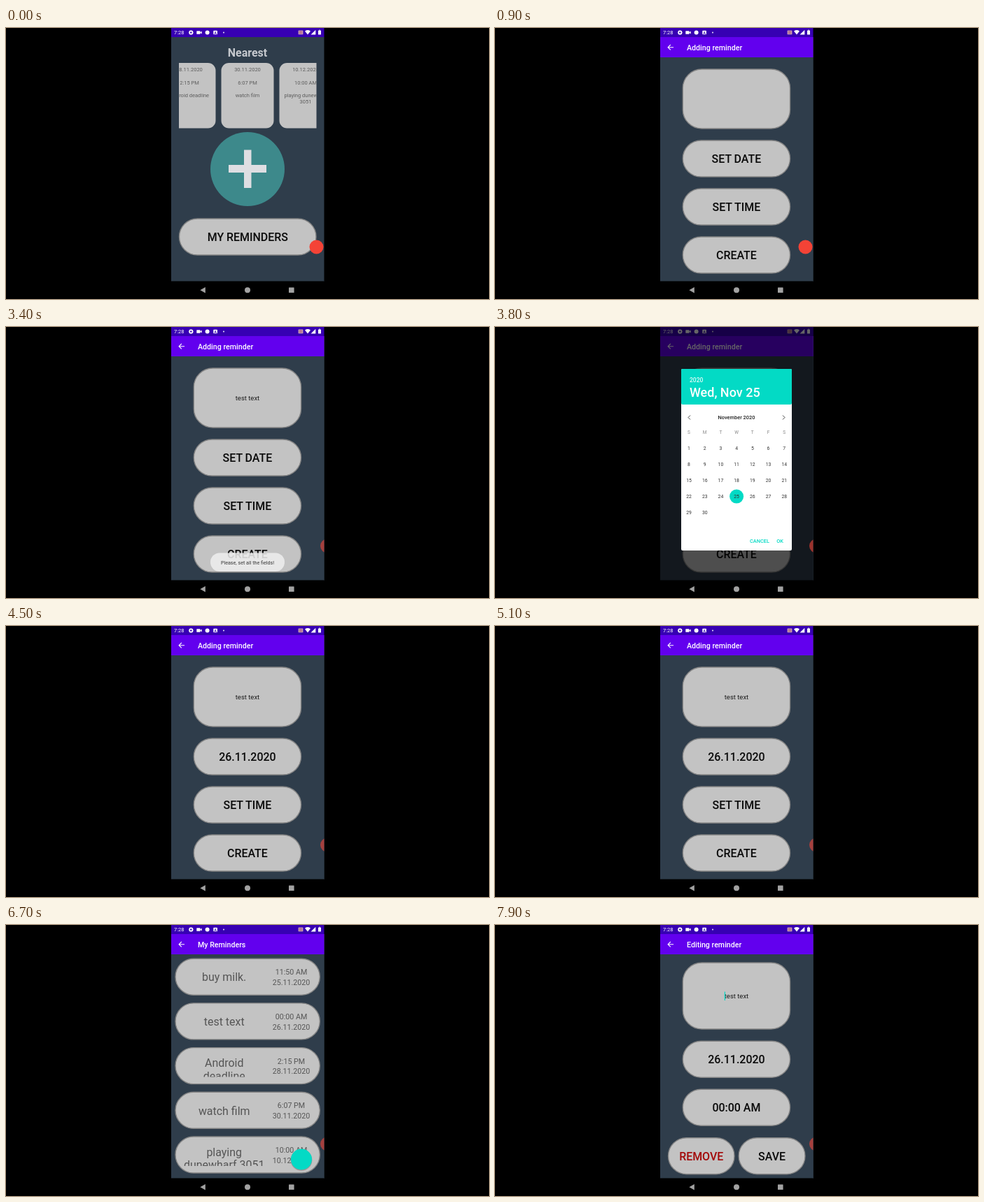
Animation of 690x388 px, one loop 8 s. Source, as an HTML page:

```html
<!DOCTYPE html>
<html lang="en">
<head>
<meta charset="utf-8">
<title>Reminders</title>
<style>
html, body { margin: 0; width: 100%; height: 100%; overflow: hidden; background: #000; }
svg { display: block; width: 100vw; height: 100vh; font-family: Roboto, sans-serif; }
</style>
</head>
<body>
<svg id="stage" viewBox="0 0 690 388"></svg>
<script>
const LOOP = 8000;
const NAVY = '#2f3d4b', GREY = '#c3c3c3', TEAL = '#03dac5', INK = '#3c4043';

const rect = (x, y, w, h, fill, rx = 0, extra = '') =>
  `<rect x="${x}" y="${y}" width="${w}" height="${h}" rx="${rx}" fill="${fill}" ${extra}/>`;
const circle = (x, y, r, fill, extra = '') =>
  `<circle cx="${x}" cy="${y}" r="${r}" fill="${fill}" ${extra}/>`;
const path = (d, fill, extra = '') => `<path d="${d}" fill="${fill}" ${extra}/>`;
const line = (d, color, w = 1) => path(d, 'none', `stroke="${color}" stroke-width="${w}"`);
const text = (x, y, size, str, fill = '#0a0a0a', weight = 400, anchor = 'middle', extra = '') =>
  `<text x="${x}" y="${y}" font-size="${size}" fill="${fill}" font-weight="${weight}" text-anchor="${anchor}" ${extra}>${str}</text>`;
const group = (id, body, extra = '') => `<g id="${id}" ${extra}>${body}</g>`;
const clip = (id, x, y, w, h) => `<clipPath id="${id}">${rect(x, y, w, h, '#fff')}</clipPath>`;

const pill = (x, y, w, h = 52, rx = 26) =>
  rect(x, y, w, h, GREY, rx, 'stroke="#858585" stroke-width="1.4"');
const button = (x, y, w, label, id = '', fill = '#0a0a0a') =>
  pill(x, y, w) + text(x + w / 2, y + 31.9, 15.95, label, fill, 500, 'middle', id && `id="${id}"`);
const gear = (x, y, r, color, hole) => {
  let teeth = '';
  for (let i = 0; i < 4; i++)
    teeth += rect(x - r * .27, y - r, r * .54, r * 2, color, .3, `transform="rotate(${i * 45} ${x} ${y})"`);
  return teeth + circle(x, y, r * .76, color) + circle(x, y, r * .36, hole);
};

const backdrop = rect(236, 13, 219, 350, NAVY);
const appBar = title => rect(236, 13, 219, 29, '#6200ee') +
  line('M255 27.7H247.2M250.8 24l-3.7 3.7 3.7 3.7', '#fff', 1.1) +
  text(274, 31.5, 10.65, title, '#fff', 500, 'start');

const milk = ['25.11.2020', '11:50 AM', ['buy milk.']];
const test = ['26.11.2020', '00:00 AM', ['test text']];
const later = [
  ['28.11.2020', '2:15 PM', ['Android', 'deadline']],
  ['30.11.2020', '6:07 PM', ['watch film']],
  ['10.12.2020', '10:00 AM', ['playing', 'dunewharf 3051']]
];

function card([date, time, words], i) {
  const x = 288.5 + i * 83, s = 7.5, c = '#5c5c5c';
  let note = [words.join(' ')];
  if (note[0].length > 18) note = ['playing dunewharf', '3051'];
  return rect(x - 37.5, 50, 75, 93.5, GREY, 11) +
    text(x, 62.2, s, date, c) + text(x, 80.6, s, time, c) +
    note.map((w, k) => text(x, 99.2 + k * 8.8, s, w, c)).join('');
}
const cards = list => list.map(card).join('');

function home() {
  return backdrop + text(345, 40.7, 15.95, 'Nearest', '#c6c9ce', 700) +
    `<g clip-path="url(#strip)">` +
    group('before', cards([milk, ...later]), 'transform="translate(-109.5 0)"') +
    group('after', cards([milk, test, ...later])) + `</g>` +
    circle(345, 202, 53, '#3d898b') +
    rect(318, 196, 54, 11, '#dedee2') + rect(340, 174.5, 10.5, 54.5, '#dedee2') +
    button(247.5, 273, 195.5, 'MY REMINDERS');
}

function adding() {
  return backdrop + appBar('Adding reminder') + pill(268.3, 59, 153.2, 85, 27) +
    text(345, 105, 9.5, '', '#1c1c1c', 400, 'middle', 'id="note"') +
    rect(0, 95.5, 1.2, 12.5, TEAL, 0, 'id="caret"') +
    button(268.3, 161, 153.2, 'SET DATE', 'date') +
    button(268.3, 230, 153.2, 'SET TIME', 'time') +
    button(268.3, 299, 153.2, 'CREATE');
}

function reminders() {
  const rows = [milk, test, ...later].map(([date, time, words], i) => {
    const y = 48.2 + i * 63.7, c = '#555';
    const first = words.length > 1 ? 27.6 : 32.2;
    return pill(242, y, 206.3) + clip('row' + i, 242, y, 140, 42) +
      `<g clip-path="url(#row${i})">` +
      words.map((w, k) => text(311.7, y + first + k * 18.4, 15.95, w, c)).join('') + `</g>` +
      text(407.5, y + 23, 10.7, time, c) + text(407.5, y + 37.6, 10.7, date, c);
  });
  return backdrop + appBar('My Reminders') + rows.join('') +
    circle(422, 336.4, 15.4, '#000', 'opacity=".22"') + circle(422, 335.5, 15, TEAL);
}

function editing() {
  return backdrop + appBar('Editing reminder') + pill(268.3, 54, 153.2, 95, 27) +
    text(345, 105, 9.5, 'test text', '#1c1c1c') +
    rect(327.8, 95.5, 1.2, 12.5, TEAL, 0, 'id="editCaret"') +
    button(268.3, 166.2, 153.2, '26.11.2020') + button(268.3, 235.2, 153.2, '00:00 AM') +
    button(247.5, 304.7, 94.5, 'REMOVE', '', '#a30808') + button(348.2, 304.7, 94.8, 'SAVE');
}

function statusBar() {
  const w = '#fff';
  return rect(236, 0, 219, 13, '#3700b3') + text(240, 9.2, 7.5, '7:28', w, 400, 'start') +
    gear(264.3, 6.5, 3.3, w, '#3700b3') +
    rect(272.3, 4.2, 5.2, 4.6, w, .6) + path('M277 6.5l2.7-2v4z', w) +
    circle(287.6, 6.5, 3, w) +
    rect(296.3, 3.7, 5.6, 5.6, w, .7) + text(299.1, 8.5, 5, 'A', '#3700b3', 700) +
    circle(311, 6.5, .9, w) +
    rect(417.6, 3.6, 6.8, 5.6, '#c9a0b4', .5) + line('M418.8 5.2h4.4M418.8 7.3h4.4', '#a33c66', .8) +
    path('M427 4.4q4-2.9 8 0l-4 5z', w) + path('M435.5 9.6h6.8V2.8z', w) +
    rect(446, 3.4, 4, 6.2, w, .5) + rect(447.2, 2.6, 1.6, 1, w);
}

function navBar() {
  const c = '#a2a2a2';
  return rect(236, 362.5, 219, 25.5, '#000') + path('M277.4 375.3l7.4-4.3v8.6z', c) +
    circle(345, 375.3, 4, c) + rect(404, 371.5, 7.6, 7.6, c, .5);
}
function lightNav() {
  const c = '#777';
  return rect(236, 362, 219, 26, '#f5f6f9') + path('M277.7 371.3h8.6l-4.3 7.4z', c) +
    circle(345, 375.3, 4, c) + rect(404, 371.5, 7.6, 7.6, c, .5) +
    rect(434.8, 373, 9, 5, 'none', .5, 'stroke="#aaa" stroke-width=".8"') +
    line('M436 374.6h6.6M437 376.4h4.6', '#aaa', .8);
}

function keyboard() {
  const c = INK;
  const keys = (str, x, y) => [...str].map((k, i) => text(x + i * 21.6, y, 14.2, k, '#202124')).join('');
  const digits = [...'1234567890'].map((d, i) => text(254.5 + i * 21.6, 245.5, 5.2, d, '#5f6368')).join('');
  return rect(236, 212.5, 219, 150, '#f7f8fb') + rect(236, 212.5, 219, 23.5, '#f3f4f7') +
    circle(248.3, 224.5, 8, '#fff') + line('M249.6 221.8l-2.7 2.7 2.7 2.7', c, 1.1) +
    circle(276.6, 223.5, 3, 'none', `stroke="${c}" stroke-width="1.2"`) + line('M279 226l3.2 3.2', c, 1.3) +
    rect(304.8, 220, 8.8, 8.8, 'none', 1.5, `stroke="${c}"`) +
    line('M307 225q2.2 2.4 4.4 0M307.2 222.8h1M310.4 222.8h1', c, .9) +
    text(341, 227.3, 7.4, 'GIF', c, 700) + gear(373.5, 224.5, 4.8, c, '#f3f4f7') +
    [408.8, 412.3, 415.8].map(x => circle(x, 224.5, 1.1, c)).join('') +
    rect(442.2, 219.5, 3.4, 6, c, 1.7) + line('M440.2 224q0 3.6 3.7 3.6t3.7-3.6M443.9 227.6v2.3', c, .9) +
    keys('qwertyuiop', 248, 256) + digits + keys('asdfghjkl', 258.5, 287) + keys('zxcvbnm', 280, 318.5) +
    path('M253 309l5.5 5.7h-2.8v4.6h-5.4v-4.6h-2.8z', 'none', `stroke="${c}" stroke-width="1.1"`) +
    path('M434 310h9.5v9H434l-4-4.5z', 'none', `stroke="${c}" stroke-width="1.1"`) +
    line('M436.2 312.4l4.2 4.2M440.4 312.4l-4.2 4.2', c) +
    text(253, 348.3, 9.5, '?123', c) + text(280, 349, 13, ',', c) +
    circle(280, 339.8, 2.5, 'none', `stroke="${c}" stroke-width=".7"`) + line('M278.8 340.6q1.2 1 2.4 0', c, .6) +
    circle(301.5, 344.7, 4.4, 'none', `stroke="${c}" stroke-width=".9"`) +
    line('M297 344.7h9M301.5 340.3q-4 4.4 0 8.8q4-4.4 0-8.8', c, .7) +
    rect(313, 337, 84, 16, '#e8eaed', 4) + text(410, 349, 13, '.', c) +
    rect(423.3, 336, 26.7, 17.3, '#1a73e8', 4) +
    line('M441 341.7v3.3h-8.5M435.2 342.2l-2.8 2.8 2.8 2.8', '#fff', 1.1);
}

const actions = y => text(392, y, 7.4, 'CANCEL', TEAL, 500, 'end') + text(412, y, 7.4, 'OK', TEAL, 500, 'end');

function dateDialog() {
  const col = i => 277 + i * 22.7;
  let days = '';
  for (let d = 1; d <= 30; d++) {
    const x = col((d - 1) % 7), y = 176 + Math.floor((d - 1) / 7) * 23;
    days += text(x, y, 6.8, d, '#333', 400, 'middle', d === 26 ? 'id="pick"' : '');
  }
  return rect(266, 60, 158, 260, '#fff', 2) + rect(266, 60, 158, 51, TEAL, 2) +
    text(278, 79, 8.5, '2020', '#e4fbf8', 500, 'start') +
    text(278, 100, 18, 'Thu, Nov 26', '#fff', 500, 'start', 'id="headline"') +
    text(345, 132, 7.4, 'November 2020', '#222', 500) +
    line('M279 126.5l-3 3 3 3M411 126.5l3 3-3 3', '#444') +
    [...'SMTWTFS'].map((d, i) => text(col(i), 153, 6.5, d, '#888')).join('') +
    circle(0, 242.6, 10, TEAL, 'id="dayDot"') + days + actions(309);
}

function timeDialog() {
  let dial = '';
  for (let h = 1; h <= 12; h++) {
    const a = h * Math.PI / 6;
    dial += text(345 + 55 * Math.sin(a), 211 - 55 * Math.cos(a), 8.5, h, h === 12 ? '#fff' : '#333');
  }
  return rect(266, 60, 158, 260, '#fff', 2) + rect(266, 60, 158, 60, TEAL, 2) +
    text(337, 101, 32, '12:00', '#fff') + text(386, 88, 8.5, 'AM', '#fff', 500) +
    text(386, 101, 8.5, 'PM', '#b8f3ed', 500) +
    circle(345, 208, 69, '#e8e8e8') + line('M345 208V153', TEAL) +
    circle(345, 208, 2, TEAL) + circle(345, 153, 10.5, TEAL) + dial + actions(309);
}

const stage = document.getElementById('stage');
stage.innerHTML = `<defs>${clip('phone', 236, 0, 218.5, 388)}${clip('strip', 247, 45, 196.5, 105)}</defs>` +
  rect(0, 0, 690, 388, '#000') + `<g clip-path="url(#phone)">` +
  group('home', home()) + group('adding', adding()) + group('list', reminders()) + group('edit', editing()) +
  statusBar() + group('keys', keyboard()) + navBar() + group('lightNav', lightNav()) +
  rect(236, 0, 219, 363, '#000', 0, 'id="scrim"') +
  group('dateDialog', dateDialog()) + group('timeDialog', timeDialog()) +
  group('toast', rect(292, 323.5, 106, 26.5, '#efefef', 13.2) + text(345, 339.6, 7.15, 'Please, set all the fields!', '#222')) +
  circle(0, 313.5, 10, '#f44336', 'id="dot"') + `</g>`;

const el = {};
stage.querySelectorAll('[id]').forEach(n => el[n.id] = n);
const set = (id, attrs) => { for (const k in attrs) el[id].setAttribute(k, attrs[k]); };
const write = (id, str) => { if (el[id].textContent !== str) el[id].textContent = str; };
const ramp = (t, a, b) => {
  const p = Math.min(1, Math.max(0, (t - a) / (b - a)));
  return 1 - (1 - p) * (1 - p);
};
const show = (id, p, slide = 0) => set(id, {
  opacity: p,
  visibility: p > 0 ? 'visible' : 'hidden',
  transform: `translate(0 ${(1 - p) * slide})`
});
const blink = t => t % 1000 < 500 ? 1 : 0;

function draw(t) {
  show('before', t < 4000 ? 1 : 0);
  set('before', { transform: 'translate(-109.5 0)' });
  show('after', t < 4000 ? 0 : 1);
  show('adding', ramp(t, 450, 700) - ramp(t, 6150, 6320), 14);
  show('list', ramp(t, 6430, 6650), 14);
  show('edit', ramp(t, 7050, 7300), 14);

  const typed = t < 2000 ? 0 : Math.min(9, 1 + Math.floor((t - 2000) / 85));
  write('note', 'test text'.slice(0, typed));
  const half = typed ? el.note.getComputedTextLength() / 2 : 0;
  set('caret', { x: 345 + half, opacity: t > 1500 && t < 2800 ? 1 : 0 });
  set('editCaret', { opacity: t < 7500 ? 1 : blink(t - 7500) });
  write('date', t < 4150 ? 'SET DATE' : '26.11.2020');
  write('time', t < 5850 ? 'SET TIME' : '00:00 AM');

  const keys = ramp(t, 1550, 1850) - ramp(t, 2700, 2880);
  set('keys', { transform: `translate(0 ${(1 - keys) * 150})`, visibility: keys > 0 ? 'visible' : 'hidden' });
  show('lightNav', t >= 1550 && t < 2800 ? 1 : 0);
  show('toast', .86 * (ramp(t, 1400, 1600) - ramp(t, 3600, 3740)));
  set('toast', { transform: '' });

  const date = ramp(t, 3620, 3800) - ramp(t, 4150, 4320);
  const time = ramp(t, 5200, 5380) - ramp(t, 5850, 6000);
  show('dateDialog', date);
  show('timeDialog', time);
  set('scrim', { opacity: .6 * Math.max(date, time) });
  const chosen = t >= 4000;
  set('dayDot', { cx: 277 + (chosen ? 4 : 3) * 22.7 });
  set('pick', { fill: chosen ? '#fff' : '#333' });
  write('headline', chosen ? 'Thu, Nov 26' : 'Wed, Nov 25');

  const hide = Math.min(1, Math.max(0, (t - 1850) / 430));
  set('dot', { cx: 443.5 + 15.5 * hide, opacity: 1 - .4 * hide });
}

const start = performance.now();
function frame() {
  draw((performance.now() - start) % LOOP);
  requestAnimationFrame(frame);
}
frame();
</script>
</body>
</html>
```
